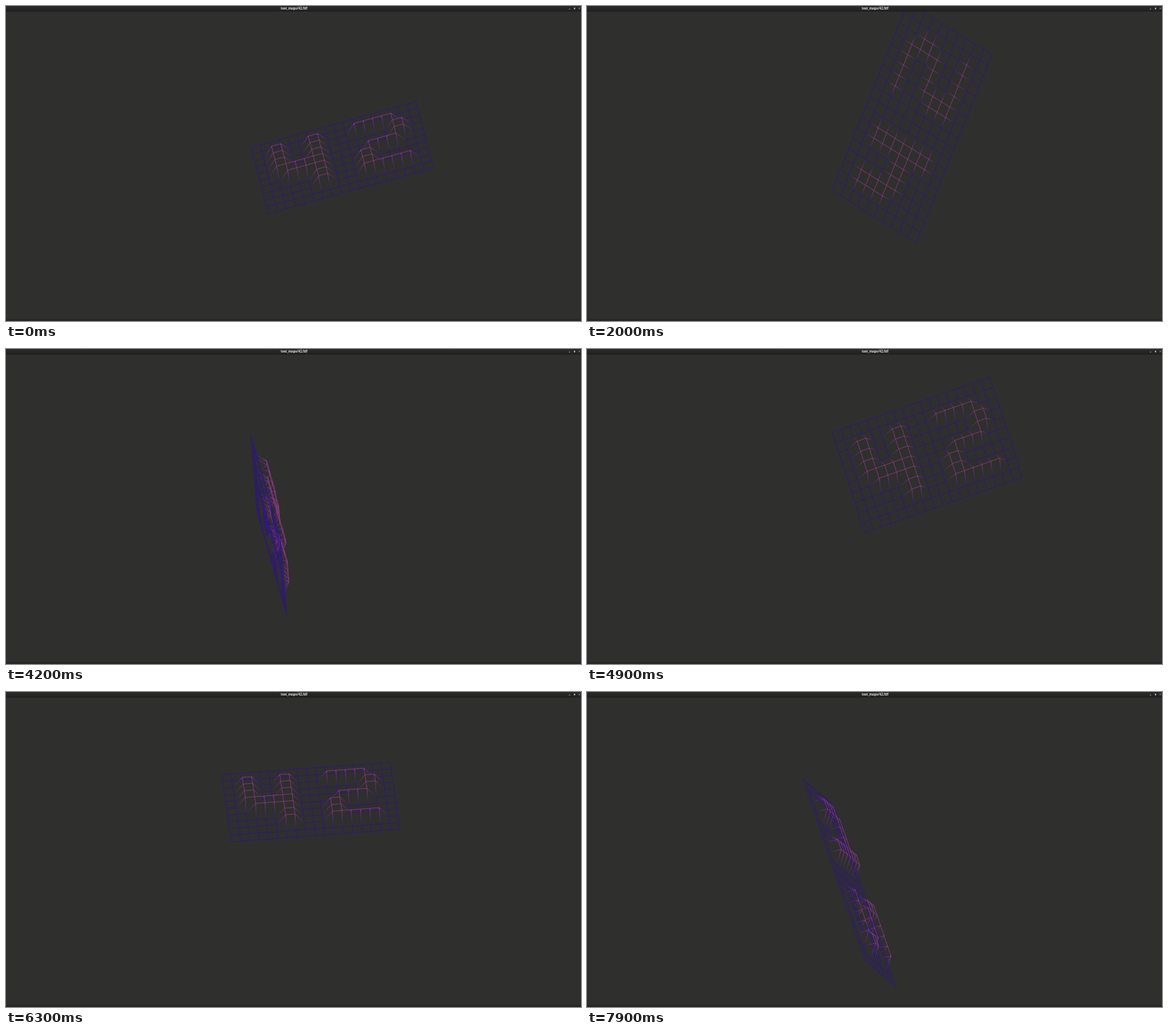
Recreate the animation shown at these times as an HTML page with a canvas. Size 800 px wide and 439 px high, loop 8 s.

```html
<!DOCTYPE html>
<html lang="en">
<head>
<meta charset="utf-8">
<title>Wireframe</title>
<style>
html, body { margin: 0; height: 100%; overflow: hidden; background: #2f2f2e; }
canvas { display: block; }
</style>
</head>
<body>
<canvas id="stage" width="800" height="439"></canvas>
<script>
const ctx = document.getElementById('stage').getContext('2d');
const LOOP = 8, FPS = 10;
const COLS = 19, ROWS = 11;
const LOW = 'rgb(45,16,152)', HIGH = 'rgb(174,62,160)';

// Raised bars that spell 42: left, top, right, bottom
const bars = [
  [2, 2, 3, 5], [3, 5, 7, 6], [6, 2, 7, 8],
  [11, 2, 15, 2], [15, 3, 16, 4], [12, 5, 15, 5], [11, 6, 12, 8], [11, 8, 16, 8]
];
const height = (x, y) =>
  bars.some(([l, t, r, b]) => x >= l && x <= r && y >= t && y <= b) ? 1 : 0;

// Turning points of each motion: [seconds, value]; angles in degrees
const tilt = [[.9, 0], [1.8, 75], [2, 219], [2.9, 383], [4.2, 304], [5, 304],
  [5.6, 377], [6.3, 360], [6.9, 282], [7.9, 402]];
const spin = [[0, -8], [.9, -121], [1.8, -130], [2, -266], [2.9, -350],
  [4.2, -234], [5.6, -394], [6.3, -360], [6.9, -232], [7.9, -323]];
const lean = [[2, -55.5], [2.9, -47], [5, -55], [5.6, -19], [6.3, -51], [7.9, -58.5]];
const left = [[5, 341], [5.6, 283], [6.3, 300]];
const top_ = [[.9, 197], [2, 257], [2.4, 213], [4.2, 120], [5.6, 113], [7.9, 121]];

// Straight moves between turning points, held at both ends
function at(track, t) {
  const i = track.findIndex(p => p[0] >= t);
  if (i < 0) return track[track.length - 1][1];
  if (i === 0) return track[0][1];
  const [t0, a] = track[i - 1], [t1, b] = track[i];
  return a + (b - a) * (t - t0) / (t1 - t0);
}

function turn(a, b, deg) {
  const r = deg * Math.PI / 180, c = Math.cos(r), s = Math.sin(r);
  return [a * c - b * s, a * s + b * c];
}

function projector(t) {
  const [ax, ay, az, ox, oy] = [tilt, spin, lean, left, top_].map(k => at(k, t));
  return (x, y, z) => {
    [z, x] = turn(z, x, ay);
    [x, y] = turn(x, y, az);
    [y, z] = turn(y, z, ax);
    return [ox + 9.26 * (x - y), oy + 6.646 * (x + y) - 13.29 * z];
  };
}

function edge(project, x0, y0, x1, y1) {
  if (x1 === COLS || y1 === ROWS) return;
  const h0 = height(x0, y0), h1 = height(x1, y1);
  const p = project(x0, y0, h0), q = project(x1, y1, h1);
  const ink = ctx.createLinearGradient(...p, ...q);
  ink.addColorStop(0, h0 ? HIGH : LOW);
  ink.addColorStop(1, h1 ? HIGH : LOW);
  ctx.strokeStyle = h0 === h1 ? (h0 ? HIGH : LOW) : ink;
  ctx.beginPath();
  ctx.moveTo(...p);
  ctx.lineTo(...q);
  ctx.stroke();
}

function drawMesh(t) {
  const project = projector(t);
  ctx.lineWidth = 0.56;
  for (let y = 0; y < ROWS; y++) {
    for (let x = 0; x < COLS; x++) {
      edge(project, x, y, x + 1, y);
      edge(project, x, y, x, y + 1);
    }
  }
}

function drawWindow() {
  const bar = ctx.createLinearGradient(0, 0, 0, 8);
  bar.addColorStop(0, '#2b2b2b');
  bar.addColorStop(1, '#202020');
  ctx.fillStyle = bar;
  ctx.fillRect(0, 0, 800, 8);
  ctx.fillStyle = '#292628';
  ctx.fillRect(0, 436, 800, 3);

  ctx.fillStyle = '#e4e4e4';
  ctx.font = 'bold 4.45px "Open Sans", "Noto Sans", sans-serif';
  ctx.textAlign = 'center';
  ctx.fillText('test_maps/42.fdf', 400.7, 5.2);

  ctx.fillStyle = ctx.strokeStyle = '#b8b8b8';
  ctx.fillRect(783, 3.8, 2, 0.7);
  ctx.fillRect(790, 2.5, 2, 2);
  ctx.lineWidth = 0.6;
  ctx.beginPath();
  ctx.moveTo(796.7, 2.4); ctx.lineTo(798.7, 4.4);
  ctx.moveTo(798.7, 2.4); ctx.lineTo(796.7, 4.4);
  ctx.stroke();
}

const start = performance.now();

function frame() {
  const t = (performance.now() - start) / 1000 % LOOP;
  ctx.fillStyle = '#2f2f2e';
  ctx.fillRect(0, 0, 800, 439);
  drawMesh(Math.floor(t * FPS) / FPS);
  drawWindow();
  requestAnimationFrame(frame);
}
frame();
</script>
</body>
</html>
```
